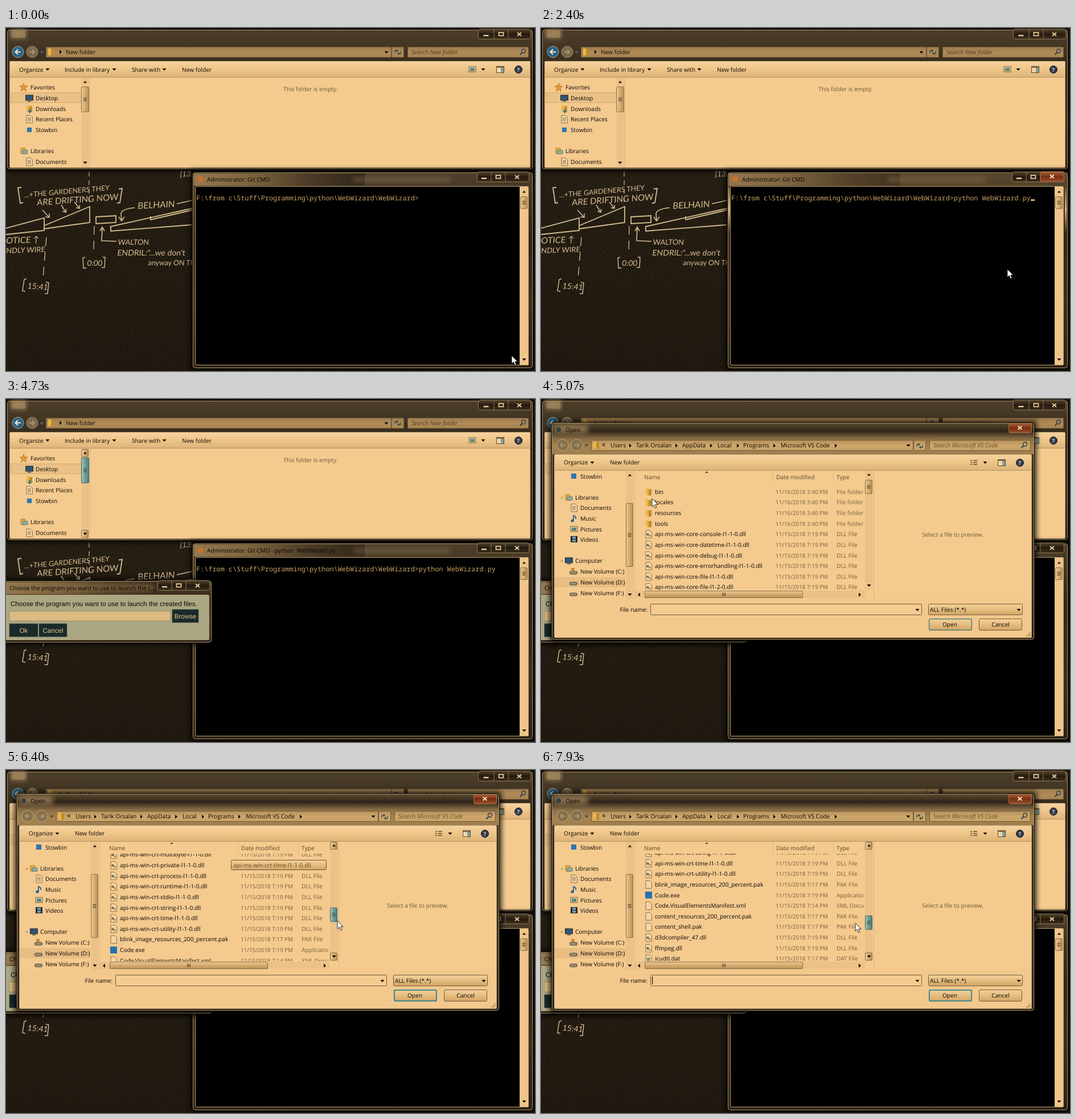
These frames come from a looping animation (929x603 px, 8 s). An HTML page:

```html
<!DOCTYPE html>
<html lang="en">
<head>
<meta charset="utf-8">
<title>Launching a script</title>
<style>
html, body { margin: 0; width: 100%; height: 100%; overflow: hidden; background: #17120c; }
svg { display: block; width: 929px; height: 603px; cursor: default; }
text { font-family: "Open Sans", "Noto Sans", sans-serif; white-space: pre; text-rendering: geometricPrecision; }
.mono { font-family: "Noto Sans Mono", "DejaVu Sans Mono", monospace; }
.arial { font-family: "Liberation Sans", Arial, sans-serif; }
.hand { font-family: Lato, sans-serif; }
</style>
</head>
<body>
<svg id="stage" viewBox="0 0 929 603" xmlns="http://www.w3.org/2000/svg"></svg>
<script>
const CREAM = '#f4ca8f', INK = '#0c0703', DIM = '#7a603c', EDGE = '#9a7d50';
const LOOP = 8000, PITCH = 18.64, FIRST = 163;

// ---- drawing helpers -------------------------------------------------
const rect = (x, y, w, h, fill, more = '') =>
  `<rect x="${x}" y="${y}" width="${w}" height="${h}" fill="${fill}" ${more}/>`;
const path = (d, stroke, w = 1, more = '') =>
  `<path d="${d}" fill="none" stroke="${stroke}" stroke-width="${w}" ${more}/>`;
const shape = (d, fill, more = '') => `<path d="${d}" fill="${fill}" ${more}/>`;
const disc = (x, y, r, fill, more = '') => `<circle cx="${x}" cy="${y}" r="${r}" fill="${fill}" ${more}/>`;
const text = (x, y, s, fill = INK, size = 10.2, more = '') =>
  `<text x="${x}" y="${y + 3.7}" fill="${fill}" font-size="${size}" ${more}>${s}</text>`;
const group = (id, body, more = '') => `<g id="${id}" ${more}>${body}</g>`;
const outline = (c = EDGE, r = 0) => `stroke="${c}" rx="${r}"`;
const haze = (x, y, w, h, fill, opacity) => rect(x, y, w, h, fill, `opacity="${opacity}" filter="url(#soft)"`);

const down = (x, y, c = INK) => shape(`M${x - 3.5} ${y - 2}h7l-3.5 4z`, c);
const up = (x, y) => shape(`M${x - 3} ${y + 1.5}h6l-3 -3.5z`, INK);
const side = (x, y, d = 1) => shape(`M${x - 2 * d} ${y - 3.5}v7l${4 * d} -3.5z`, INK);

function grip(x, y, flat) {
  const line = i => flat ? `M${x + i} ${y - 3}v6` : `M${x - 3} ${y + i}h6`;
  return path([-2.5, 0, 2.5].map(line).join(''), '#4a3820', 1);
}
function thumb(x, y, w, h, hot) {
  return rect(x + .5, y + .5, w - 1, h - 1, hot ? 'url(#hot)' : w > h ? 'url(#barV)' : 'url(#barH)',
    outline(hot ? '#2f6670' : '#8d7148', 1.5)) + grip(x + w / 2, y + h / 2, w > h);
}
const hotButton = (x, y) => rect(x + .5, y + .5, 12, 13, 'url(#barH)', outline('#8d7148', 1.5));

const folder = (x, y) =>
  shape(`M${x - 5} ${y - 6}h5l1 12h-6z`, '#e9b649') + shape(`M${x} ${y - 4}l5 -1v11l-5 1z`, '#c08a27');
const drive = (x, y) => rect(x - 6.5, y, 13, 5, '#9b9078', outline('#4d4431', 2)) + disc(x + 4, y + 2.5, 1, '#4f9a48');
const monitor = (x, y) => rect(x - 6.5, y - 5, 13, 9, '#2c5577', outline('#33291a')) + rect(x - 3, y + 5, 6, 1.5, '#5c4a2f');
const library = (x, y) => rect(x - 6, y - 5, 8, 10, '#e4ad43', outline('#a87a2b', 1)) + rect(x - 3, y - 1, 9, 6, '#8fb0a3', outline('#57736d', 1));
function page(x, y, kind) {
  let s = shape(`M${x - 5} ${y - 6.5}h7l3.5 3.5v10h-10.5z`, '#f6d6a3', 'stroke="#7d6640" stroke-width=".9"');
  if (kind === 'gear') s += disc(x - 1.5, y + .5, 2.2, '#75684c') + disc(x + 2, y + 3, 1.8, '#a5864f');
  if (kind === 'lines') s += path(`M${x - 3} ${y - 2}h6m-6 2.5h6m-6 2.5h6`, '#75684c', 1);
  if (kind === 'data') s += rect(x - 3, y - 2, 6, 6, '#8b9a76');
  if (kind === 'film') s += rect(x - 5, y - 5, 10, 11, '#2f2d28') + rect(x - 3, y - 3, 6, 3, CREAM) + rect(x - 3, y + 2, 6, 2, '#87a0ad');
  return s;
}
const picture = (x, y) => rect(x - 6, y - 5, 12, 9, '#f6d6a3', outline('#66583a')) + rect(x - 4, y - 3, 8, 3, '#4f87a1') + rect(x - 4, y, 8, 2.5, '#5c8248');
const preview = (x, y) => rect(x - 6.5, y - 5.5, 13, 11, '#f6d6a3', outline('#5d4c30')) + rect(x + 1, y - 3, 5, 8, '#7ba0a4') + path(`M${x - 6} ${y - 4}h12`, '#5d4c30', 1.5);
const help = (x, y) => disc(x, y, 6.5, '#303a52', 'stroke="#17151a"') + text(x - 2.4, y, '?', '#f5d9ac', 9.5, 'font-weight="700"');
const lens = (x, y) => disc(x + 1, y - 1.5, 3.4, 'none', 'stroke="#2b3f4e" stroke-width="1.5"') + path(`M${x - 1.5} ${y + 1}l-4 4`, '#2b3f4e', 2);
const refresh = (x, y) => path(`M${x - 5} ${y + 2}v-4h5m-2 -2l2 2l-2 2M${x + 5} ${y - 1}v4h-5m2 -2l-2 2l2 2`, '#2d4a50', 1.3);

// Glass frame around a client area.
function frame(x, y, w, h, client) {
  const [cx, cy, cw, ch] = client;
  return haze(x - 3, y - 3, w + 6, h + 6, '#000', .8) +
    rect(x + .5, y + .5, w - 1, h - 1, 'url(#glass)', outline('#070503', 5)) +
    rect(x + 1.5, y + 1.5, w - 3, h - 3, 'none', outline('#b09467', 4)) +
    rect(cx - .5, cy - .5, cw + 1, ch + 1, '#0a0704', outline('#b89c6d', 1));
}
// Minimise, maximise and close; l, m, n, r are the dividing edges.
function controls(l, m, n, r, y) {
  const cy = y + 9, c = '#e8c898';
  return rect(l + .5, y, r - l, 17.5, 'url(#ctl)', outline('#8f764c', 3)) +
    path(`M${m} ${y}v17.5M${n} ${y}v17.5`, '#8f764c') +
    rect((l + m) / 2 - 4.5, cy + 1, 9, 2.5, c) +
    rect((m + n) / 2 - 4, cy - 3, 8, 5.5, 'none', `stroke="${c}" stroke-width="1.8"`) + cross((n + r) / 2, cy, c);
}
const cross = (x, y, c = '#f3ddb8') => path(`M${x - 3.5} ${y - 3}l7 6m0 -6l-7 6`, c, 2);
const redClose = (x, y, w, h) => rect(x + .5, y + .5, w, h, 'url(#red)', outline('#a5754c', 3)) + cross(x + w / 2, y + h / 2);
const field = (x, y, w, h, fill = 'url(#bar)') => rect(x + .5, y + .5, w - 1, h - 1, fill, outline('#735a36', 1));

// ---- scene parts -----------------------------------------------------
function defs() {
  const grad = (id, stops, flat) => `<linearGradient id="${id}" x2="${flat ? 1 : 0}" y2="${flat ? 0 : 1}">` +
    stops.map((c, i) => `<stop offset="${i / (stops.length - 1)}" stop-color="${c}"/>`).join('') + '</linearGradient>';
  return '<defs>' + grad('wall', ['#2a2115', '#20190f', '#1b140c']) + grad('glass', ['#4d3f2a', '#2f2518', '#3a2e1e', '#2a2115']) +
    grad('ctl', ['#54442d', '#241b11', '#3b2f1e']) + grad('red', ['#a8653c', '#7a2c12', '#97522d']) +
    grad('bar', ['#9c7c4e', '#b08a57', '#a98451']) + grad('bar2', ['#b5905b', '#cda66a', '#c8a167']) +
    grad('tool', ['#f5d29e', '#efc588', '#dcb47a']) + grad('barH', ['#efc993', '#d4ab70', '#b98f57'], 1) +
    grad('barV', ['#efc993', '#d4ab70', '#b98f57']) + grad('hot', ['#b5c6a9', '#6c9d99', '#4d8085'], 1) +
    grad('push', ['#f3d19b', '#e6bd80', '#d0a565']) + grad('title', ['#94794f', '#7d643f', '#4c3c27', '#2f2518'], 1) +
    grad('shine', ['#6b5638', '#d8b681', '#3c2f1d']) + grad('openTop', ['#5a4930', '#2e2418', '#8a6e46', '#a5834f', '#a07e4d']) +
    `<filter id="soft" x="-10%" y="-50%" width="120%" height="200%"><feGaussianBlur stdDeviation="5"/></filter>
    <filter id="grain"><feTurbulence type="fractalNoise" baseFrequency=".5" numOctaves="2" seed="4"/>
    <feColorMatrix values="0 0 0 0 .75  0 0 0 0 .6  0 0 0 0 .36  1.6 0 0 0 -.6"/></filter>
    <clipPath id="rowsClip"><rect x="165" y="147" width="402" height="189"/></clipPath>
    <clipPath id="navClip"><rect x="24" y="126" width="124" height="225"/></clipPath></defs>`;
}

function wallpaper() {
  const c = '#d5bd91';
  const hand = (x, y, s, size, turn = 0) =>
    `<text class="hand" fill="${c}" font-size="${size}" transform="translate(${x} ${y}) rotate(${turn}) skewX(-6)">${s}</text>`;
  return rect(0, 0, 929, 603, 'url(#wall)') + rect(0, 0, 929, 603, '#000', 'filter="url(#grain)" opacity=".12"') +
    path('M27 280l-6 1l4 27l5 -1M198 283l6 -1l-4 25l-5 1', c, 1.8) +
    hand(32, 298, '...+THE GARDENERS THEY', 12.4, -5) + hand(54, 312, 'ARE DRIFTING NOW', 15, -4) +
    path('M0 352L67 334V356L0 363M68 347L147 314V342L67 353M158 332L193 330V342L158 344ZM327 317L184 349V357L326 346M254 331V337L327 320', c, 1.8) +
    path('M203 338l-1 -12q2 -8 24 -10M198 332l5 7l5 -7M300 309l27 -6M169 351l-1 23l26 1M165 357l4 -7l4 7', c, 1.6) +
    path('M64 320l12 13m-7 -1l7 1l0 -7M97 311l8 13m-6 -2l6 2l1 -6M120 306l9 11m-6 -1l6 1l0 -6', c, 1.5) +
    path('M146 253v58', c, 1.2, 'stroke-dasharray="8 7"') + path('M71 368L65 440M155 348l-1 50', c, 1.3, 'stroke-dasharray="15 11"') +
    hand(231, 318, 'BELHAIN', 15.5, -3) + hand(196, 381, 'WALTON', 13) +
    hand(195, 400, 'ENDRIL:"...we don\'t', 14) + hand(249, 417, 'anyway ON TH', 12.5) +
    hand(0, 379, 'OTICE ↑', 15, -2) + hand(0, 396, 'NDLY WIRE', 13, -2) +
    path('M139 403l-4 1l1 18l5 0M170 403l4 0l-1 18l-5 0M36 441l-4 1l-3 20l5 1M70 447l5 1l-2 19l-5 0', c, 1.4) +
    hand(142, 418, '0:00', 13.5) + hand(37, 458, '15:41', 14, 4) + hand(305, 261, '[13:', 13);
}

function explorer() {
  const items = [['Desktop', 123], ['Downloads', 142], ['Recent Places', 160], ['Stowbin', 179], ['Documents', 235]];
  return frame(1, 2, 925, 247, [7, 59, 913, 186]) +
    haze(8, 2, 28, 16, '#a5895f', .8) + rect(10, 3, 24, 14, '#a5895f', 'opacity=".6"') +
    controls(829, 857, 882, 921, 2) +
    disc(21, 42, 10, '#28648a', 'stroke="#b5a27d"') + path('M26 42h-9m4 -4.5l-4.5 4.5l4.5 4.5', '#f4e2c4', 2.2) +
    disc(46, 42, 10, '#7a694d', 'stroke="#a28a63"') + path('M41 42h9m-4 -4l4 4l-4 4', '#a9956f', 2) + down(63, 43, '#4c6470') +
    field(70, 33, 607, 19) + field(677, 33, 22, 19) + field(705, 33, 213, 19) + folder(79, 42) + side(96, 42) + text(105, 42, 'New folder') +
    down(668, 43) + refresh(688, 42) + text(712, 42, 'Search New folder', '#4f3d24', 10.2, 'font-style="italic"') + lens(908, 42) +
    rect(7, 59, 913, 186, CREAM) + rect(7, 59, 913, 27, 'url(#tool)') + path('M7 86.5h913', '#b4925f') +
    text(23, 73, 'Organize') + down(73, 73) + text(103, 73, 'Include in library') + down(190, 73) + text(221, 73, 'Share with') + down(278, 73) + text(309, 73, 'New folder') +
    picture(819, 73) + down(838, 73) + preview(868, 73) + help(900, 73) +
    shape('M31 97l2 5h5l-4 3.5l1.5 5.5l-4.5 -3l-4.5 3l1.5 -5.5l-4 -3.5h5z', '#e59a2f', 'stroke="#a8651c" stroke-width=".7"') +
    text(43, 104, 'Favorites') + rect(8.5, 114, 124, 17, '#e9c189', outline('#d3a96d')) + items.map(([s, y]) => text(52, y, s)).join('') +
    monitor(41, 123) + folder(41, 142) + shape('M40 143h3v3h2l-3.5 4l-3.5 -4h2z', '#3474a2') + page(41, 160, 'lines') +
    rect(37, 175, 8, 8, '#2f75ad') + library(32, 216) + text(43, 216, 'Libraries') + page(41, 235, 'lines') +
    rect(133, 87, 13, 158, '#ecc188') + path('M147.5 87v158', '#dcb57d') +
    group('exHot', hotButton(132, 88) + hotButton(132, 230)) + up(139, 95) + down(139, 237) +
    thumb(132, 103, 14, 45) + group('exThumb', thumb(132, 103, 14, 45, true)) + text(487, 107, 'This folder is empty.', '#6f5736');
}

function terminal() {
  return frame(327, 253, 599, 346, [333, 279, 584, 313]) +
    rect(330, 256, 300, 21, 'url(#title)') + haze(610, 262, 170, 9, '#a5895f', .4) +
    group('focusGlow', rect(329, 280, 3, 78, 'url(#shine)') + rect(920, 280, 3, 78, 'url(#shine)') + rect(330, 256, 594, 22, '#8a6c43', 'opacity=".18"')) +
    rect(337, 261, 9, 9, '#c9702e') + '<text id="caption" x="353" y="269.8" font-size="10.2" fill="#060402"></text>' +
    controls(827, 852, 877, 918, 253) + group('focusClose', redClose(877, 252, 41, 18)) +
    rect(333, 279, 584, 313, '#000') + rect(902, 279, 15, 313, '#efc58b') + up(910, 288) + down(910, 583) + thumb(903, 296, 13, 22) +
    '<text id="command" class="mono" x="334" y="302.5" font-size="11.85" fill="#c9a263"></text>' + rect(0, 301, 7, 3, '#d2ab6b', 'id="caret"');
}

function chooser() {
  const push = (x, y, w, s) => rect(x, y, w, 23, '#1a2a2a', 'stroke="#44504a" stroke-width=".7"') +
    text(x + w / 2, y + 12, s, '#eac58c', 11.57, 'class="arial" text-anchor="middle"');
  return frame(-6, 319, 368, 110, [-2, 345, 358, 78]) + rect(0, 322, 264, 21, 'url(#title)') + haze(80, 326, 180, 12, '#8a6e46', .7) +
    text(6, 332, 'Choose the program you want to use to launch the c...', '#060402') +
    controls(266, 291, 316, 357, 319) + rect(-2, 345, 358, 78, '#aba783') +
    text(8, 360, 'Choose the program you want to use to launch the created files.', '#0b0b08', 11.57, 'class="arial"') +
    rect(6, 373, 283, 17, '#dcba81', 'stroke="#8e8763" stroke-width=".8"') + push(292, 370, 46, 'Browse') + push(6, 395, 50, 'Ok') + push(58, 395, 49, 'Cancel');
}

// ---- file list -------------------------------------------------------
const api = (set, names) => names.split(' ').map(n => `api-ms-win-${set}-${n}${/-l\d/.test(n) ? '' : '-l1-1-0'}.dll`);
const files = [
  'bin', 'locales', 'resources', 'tools',
  ...api('core', 'console datetime debug errorhandling file file-l1-2-0 file-l2-1-0 handle heap interlocked libraryloader localization-l1-2-0 memory namedpipe processenvironment processthreads processthreads-l1-1-1 profile rtlsupport string synch synch-l1-2-0 sysinfo timezone util'),
  ...api('crt', 'conio convert environment filesystem heap locale math multibyte private process runtime stdio string time utility'),
  ...('blink_image_resources_200_percent.pak Code.exe Code.VisualElementsManifest.xml content_resources_200_percent.pak content_shell.pak d3dcompiler_47.dll ffmpeg.dll icudtl.dat libEGL.dll libGLESv2.dll msvcp140.dll natives_blob.bin node.dll pdf_viewer_resources.pak ' +
    'snapshot_blob.bin ucrtbase.dll ui_resources_200_percent.pak unins000.dat unins000.exe unins000.msg v8_context_snapshot.bin vcruntime140.dll views_resources_200_percent.pak').split(' ')
];
const kinds = { exe: 'Application', xml: 'XML Document', bin: 'QNP media file' };
const icons = { dll: 'gear', dat: 'data', bin: 'film' };

function row(name, i) {
  const y = FIRST + i * PITCH, ext = i < 4 ? '' : name.split('.').pop();
  const time = { dll: '7:19', exe: '7:19', xml: '7:14' }[ext] || '7:17';
  const icon = !ext ? folder(189, y) : ext === 'exe' ? rect(183, y - 6, 12, 12, '#2272ae') : page(189, y, icons[ext]);
  return icon + text(200, y, name) +
    text(412, y, ext ? `11/15/2018 ${time} PM` : '11/16/2018 3:40 PM', DIM, 9.9) +
    text(519, y, ext ? kinds[ext] || ext.toUpperCase() + ' File' : 'File folder', DIM);
}

function openDialog() {
  const crumbs = [['Users', 122, 157], ['Tarik Orsalan', 167, 238], ['AppData', 248, 299], ['Local', 310, 346], ['Programs', 355, 410], ['Microsoft VS Code', 421, 518]];
  const nav = [['Stowbin', 69, 136], ['Libraries', 60, 173], ['Documents', 69, 191], ['Music', 69, 210], ['Pictures', 69, 229], ['Videos', 69, 247],
    ['Computer', 60, 284], ['New Volume (C:)', 69, 303], ['New Volume (D:)', 69, 322], ['New Volume (F:)', 69, 341]];
  const center = 'text-anchor="middle"';
  return frame(18, 41, 849, 383, [24, 98, 837, 321]) + rect(20, 43, 845, 54, 'url(#openTop)') +
    haze(22, 46, 60, 14, '#a5865a', .8) + disc(31, 54, 4, '#34414c') + text(43, 54, 'Open', '#060402') + redClose(821, 42, 40, 17) +
    disc(38, 81, 10, '#82704f', 'stroke="#c2a678"') + disc(63, 81, 10, '#82704f', 'stroke="#c2a678"') +
    path('M43 81h-9m4 -4l-4 4l4 4M58 81h9m-4 -4l4 4l-4 4', '#a9946c', 2) + down(80, 82, '#5b482d') +
    field(88, 72, 566, 19, 'url(#bar2)') + field(654, 72, 22, 19, 'url(#bar2)') + field(682, 72, 178, 19, 'url(#bar2)') + folder(97, 81) + text(107, 80, '«', INK, 13) +
    crumbs.map(([s, x, a]) => text(x, 81, s) + side(a, 82)).join('') + down(645, 82) + refresh(665, 82) +
    text(689, 81, 'Search Microsoft VS Code', '#66502f', 10.2, 'font-style="italic"') + lens(849, 81) +
    rect(24, 98, 837, 321, CREAM) + rect(24, 98, 837, 27, 'url(#tool)') + path('M24 125.5h837', '#b4925f') +
    text(40, 111.5, 'Organize') + down(90, 112) + text(121, 111.5, 'New folder') +
    path('M754 108h3m2 0h7m-12 3.5h3m2 0h7m-12 3.5h3m2 0h7', '#5d4c30', 1.5) + down(780, 112) + preview(809, 112) + help(841, 112) +
    `<g clip-path="url(#navClip)">` + rect(24, 313, 125, 18, '#e7bd83') + nav.map(([s, x, y]) => text(x, y, s)).join('') +
    rect(53, 131, 9, 9, '#2f75ad') + library(49, 173) + page(58, 191, 'lines') + path('M57 214v-9q5 1 4 6', '#2c6190', 1.8) + disc(55, 214, 2.6, '#2c6190') +
    picture(58, 229) + rect(52, 241, 12, 11, '#2d2a24') + rect(55, 242, 6, 4, '#6c9ab4') + rect(55, 247, 6, 4, '#6c9ab4') + monitor(49, 284) +
    drive(57, 303) + rect(53, 297, 6, 5, '#d18b30') + drive(57, 322) + drive(57, 341) + '</g>' +
    shape('M34 175l4 0l0 -4zM34 286l4 0l0 -4z', '#b58f58') +
    rect(149, 126, 13, 225, '#ecc188') + up(156, 134) + down(156, 344) + thumb(149, 183, 13, 112) + path('M164.5 126v225M584.5 126v225', '#dcb57d') +
    `<g clip-path="url(#rowsClip)">` + group('rows', files.map(row).join('')) + '</g>' +
    text(181, 137, 'Name', '#5d482b') + text(413, 137, 'Date modified', '#5d482b') + text(519, 137, 'Type', '#5d482b') +
    path('M407.5 127v20M513.5 127v20', '#deb67d') + shape('M288 130h6l-3 -3z', '#5d482b') +
    rect(569, 126, 13, 210, '#ecc188') + group('listHot', hotButton(569, 126) + hotButton(569, 321)) + up(576, 133) + down(576, 328) +
    group('bar', group('barCool', thumb(569, 142, 13, 25)) + group('barHot', thumb(569, 142, 13, 25, true))) +
    rect(165, 337, 404, 13, '#ecc188') + side(172, 344, -1) + side(560, 344) + thumb(182, 337, 278, 13) +
    text(723, 238.5, 'Select a file to preview.', '#6f5736', 10.2, center) +
    rect(24, 351, 837, 68, '#f2c88d') + text(187, 370, 'File name:', INK, 10.2, 'text-anchor="end"') +
    field(192, 360, 477, 20, '#f4cb91') + down(661, 371) + rect(195, 363, 1.2, 14, INK, 'id="nameCaret"') +
    rect(680.5, 360.5, 165, 19, 'url(#push)', outline('#745b38', 2)) + text(683, 370, 'ALL Files (*.*)') + down(839, 371) +
    rect(681.5, 386.5, 75, 20, 'url(#push)', outline('#5e6a58', 2.5)) + rect(682, 387, 74, 19, 'none', 'id="pulse" stroke="#3b8790" stroke-width="2" rx="2"') +
    text(718, 396.5, 'Open', INK, 10.2, center) + rect(769.5, 386.5, 75, 20, 'url(#push)', outline('#745b38', 2.5)) + text(807, 396.5, 'Cancel', INK, 10.2, center) +
    path('M852 418l8 -8m-4 8l4 -4', '#b38f5b', 1.5) +
    group('tip', rect(395.5, 158.5, 167, 17, 'url(#push)', outline('#6f5836', 2)) + '<text id="tipText" x="399" y="171" font-size="10.2" fill="#5d482b"></text>');
}

const pointer = () => group('pointer', shape('M0 0V14.3L3.3 11.2L5.7 16.6L8 15.6L5.7 10.4H10.2Z', '#fff', 'stroke="#1a130b" stroke-width=".9"'));

const stage = document.getElementById('stage');
stage.innerHTML = defs() + wallpaper() + explorer() + terminal() + group('chooser', chooser()) + group('dialog', openDialog()) + pointer();
const el = {};
stage.querySelectorAll('[id]').forEach(n => el[n.id] = n);

// ---- motion ----------------------------------------------------------
const pathKeys = [[70, 888, 576], [450, 846, 480], [800, 818, 424], [1070, 818, 424], [1130, 819, 424], [1330, 819, 424], [1400, 819, 424],
  [3270, 819, 424], [3650, 560, 433], [4070, 318, 376], [4130, 317, 376], [4640, 140, 120], [4930, 180, 165], [5070, 195, 175],
  [5200, 197, 176], [5780, 578, 153], [5870, 578, 155], [6400, 582, 265], [6670, 581, 279], [6800, 581, 279], [7130, 580, 291],
  [7300, 580, 291], [7600, 578, 274], [7670, 578, 274], [7930, 552, 269]];
const scrollKeys = [[5850, 0], [6400, 685], [6670, 785], [6800, 785], [7130, 898], [7300, 898], [7600, 782]];

function at(keys, t) {
  const n = keys.findIndex(k => k[0] > t);
  if (n < 0) return keys[keys.length - 1].slice(1);
  if (n === 0) return keys[0].slice(1);
  const a = keys[n - 1], b = keys[n], p = (t - a[0]) / (b[0] - a[0]);
  return a.slice(1).map((v, i) => v + (b[i + 1] - v) * p);
}
const during = (t, a, b) => t >= a && t < b;
const ramp = (t, a, b) => Math.min(1, Math.max(0, (t - a) / (b - a)));
const see = (n, on) => n.setAttribute('visibility', on ? 'visible' : 'hidden');
const isOn = (n, on) => n.setAttribute('display', on ? 'inline' : 'none');
const move = (n, x, y) => n.setAttribute('transform', `translate(${x.toFixed(2)} ${y.toFixed(2)})`);

// Windows fade in while growing slightly around their centre.
function appear(node, p, cx, cy) {
  const s = .94 + .06 * p;
  node.setAttribute('opacity', p);
  isOn(node, p > 0);
  node.setAttribute('transform', `translate(${cx} ${cy}) scale(${s}) translate(${-cx} ${-cy})`);
}

function show(t) {
  const typed = t < 1870 ? '' : t < 2070 ? 'py' : 'python WebWizard.py';
  el.command.textContent = 'F:\\from c\\Stuff\\Programming\\python\\WebWizard\\WebWizard>' + typed;
  el.caret.setAttribute('x', 725 + typed.length * 7.11);
  see(el.caret, during(t, 1330, 2070) || during(t, 2400, 2600));
  el.caption.textContent = 'Administrator: Git CMD' + (t < 2600 ? '' : ' - python  WebWizard.py');
  const focused = during(t, 760, 2870);
  see(el.focusGlow, focused);
  see(el.focusClose, focused);

  appear(el.chooser, ramp(t, 2850, 3070), 180, 374);
  appear(el.dialog, ramp(t, 4870, 5050), 442, 232);
  const overNav = during(t, 4600, 4930);
  see(el.exHot, overNav);
  see(el.exThumb, overNav);

  const [scroll] = at(scrollKeys, t), hot = t >= 5780;
  move(el.rows, 0, -scroll);
  move(el.bar, 0, scroll / 6.87);
  isOn(el.listHot, hot);
  isOn(el.barHot, hot);
  isOn(el.barCool, !hot);
  isOn(el.tip, during(t, 5880, 7670));
  el.tipText.textContent = files[Math.round(scroll / 16.17)];
  isOn(el.nameCaret, t >= 7670);
  el.pulse.setAttribute('opacity', .4 + .5 * ramp(t, 5100, 5800) + .08 * Math.sin(t / 320));

  const [x, y] = at(pathKeys, t);
  move(el.pointer, x, y);
  see(el.pointer, !during(t, 4640, 4930));
}

const start = performance.now();
function tick() {
  show((performance.now() - start) % LOOP);
  requestAnimationFrame(tick);
}
tick();
</script>
</body>
</html>
```
